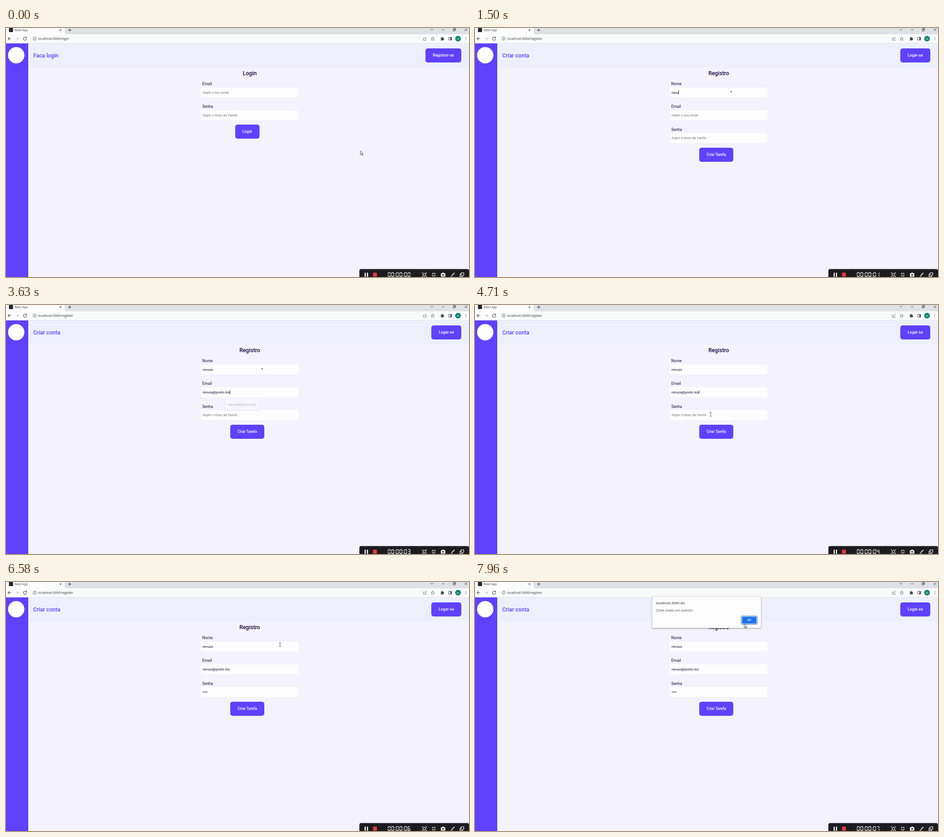
Animation of 1020x549 px, one loop 8 s. Source, as an HTML page:

```html
<!DOCTYPE html>
<html lang="pt">
<head>
<meta charset="utf-8">
<title>Criar conta</title>
<style>
  html, body { margin: 0; width: 100%; height: 100%; overflow: hidden; background: #f4f2fd; }
  svg { display: block; width: 100vw; height: 100vh; }
  .app { font-family: Roboto, "Liberation Sans", sans-serif; }
  .ui { font-family: "Open Sans", "Noto Sans", sans-serif; }
</style>
</head>
<body>
<svg id="stage" viewBox="0 0 1020 549" xmlns="http://www.w3.org/2000/svg">
  <defs>
    <radialGradient id="glow">
      <stop offset="0" stop-color="#f8d5da"/>
      <stop offset=".55" stop-color="#f2a3ab"/>
      <stop offset="1" stop-color="#e67883"/>
    </radialGradient>
    <filter id="shadow" x="-10%" y="-20%" width="120%" height="150%">
      <feDropShadow dx="0" dy="1" stdDeviation="1.2" flood-color="#000" flood-opacity=".35"/>
    </filter>
  </defs>
</svg>
<script>
const LOOP = 8000;
const PURPLE = '#5f41ff', INK = '#160b3b', GREY = '#5f6368', HINT = '#757575';
const USER = 'nevuza', MAIL = USER + '@ponto.test';
const SUGGESTIONS = [MAIL, USER + '.code@ponto.test', USER + '.pirelo@ponto.test', USER, USER + '@'];
const stage = document.getElementById('stage');

function add(parent, tag, attrs) {
  const el = document.createElementNS('http://www.w3.org/2000/svg', tag);
  for (const k in attrs) el.setAttribute(k, attrs[k]);
  parent.appendChild(el);
  return el;
}
const group = (parent = stage, attrs = {}) => add(parent, 'g', attrs);
const rect = (p, x, y, width, height, fill, rx = 0, more = {}) =>
  add(p, 'rect', { x, y, width, height, fill, rx, ...more });
const circle = (p, cx, cy, r, fill, more = {}) => add(p, 'circle', { cx, cy, r, fill, ...more });
const line = (p, d, stroke = '#3c4043', width = 1, more = {}) =>
  add(p, 'path', { d, stroke, fill: 'none', 'stroke-width': width, ...more });
function text(p, str, x, y, size, fill, more = {}) {
  const el = add(p, 'text', { x, y, fill, 'font-size': size, ...more });
  el.textContent = str;
  return el;
}
const show = (el, on) => el.setAttribute('display', on ? 'inline' : 'none');
const clamp = v => Math.min(1, Math.max(0, v));

function button(p, x, y, w, label, size) {
  rect(p, x, y, w, 31, PURPLE, 5);
  text(p, label, x + w / 2, y + 18.4, size, '#fff', { 'text-anchor': 'middle', 'font-weight': 500 });
}

function field(p, y, label, hint) {
  text(p, label, 432.5, y - 5, 8.5, INK);
  rect(p, 429, y, 215, 21.5, '#fdfdfd', 2.5);
  return text(p, hint, 433, y + 13.3, 7.4, HINT);
}

function drawBrowser() {
  const g = group(stage, { class: 'ui' });
  rect(g, 0, 0, 1020, 34, '#fdfdfd');
  add(g, 'path', { d: 'M129 0H1020V14H134Q129 14 129 9Z', fill: '#dee1e6' });
  rect(g, 53, 16.5, 896, 14, '#f8f9f9', 7);
  rect(g, 0, 33, 1020, 1, '#e4e5e8');
  rect(g, 6.5, 0, 9, 9, '#20232a', 1);
  text(g, 'React App', 19, 7.2, 6.2, '#3c4043');
  line(g, 'M118 2.7l4 4m0-4l-4 4M136.8 4.7h7M140.3 1.2v7', '#303236');
  line(g, 'M935.5 2.2l2.8 2.8 2.8-2.8M960.5 4h5M1010.8 1.5l5 5m0-5l-5 5', '#303236', .9);
  line(g, 'M985 2.5h4v4h-4zM986.3 2.3v-1.3h4v4h-1.2', '#303236', .9);
  line(g, 'M11.5 23.5h-7m3.3-3.3l-3.3 3.3 3.3 3.3', '#45484d', 1.1);
  line(g, 'M21 23.5h7m-3.3-3.3l3.3 3.3-3.3 3.3', '#c0c3c7', 1.1);
  line(g, 'M44.6 21.3a3.5 3.5 0 1 0 .7 3.2M45.4 19.6v2.6h-2.6', '#45484d', 1.1);
  circle(g, 63.2, 23.5, 3.4, 'none', { stroke: GREY, 'stroke-width': .9 });
  line(g, 'M63.2 23v2.3M63.2 21.3v.9', GREY, .9);
  const url = text(g, '', 71.3, 26.1, 7.2, '#303236');
  line(g, 'M920.5 22h-1.2v5h6.5v-2M921.3 24.8q.5-3 4-3m-1.5-1.8l2 1.8-2 1.8', GREY, .8);
  line(g, 'M940 19.7l1.1 2.6 2.8.2-2.1 1.9.7 2.8-2.5-1.5-2.5 1.5.7-2.8-2.1-1.9 2.8-.2z', GREY, .8);
  add(g, 'path', { d: 'M957.7 21.2h2a1.2 1.2 0 0 1 2.4 0h2v2a1.2 1.2 0 0 1 0 2.4v1.7h-6.4v-1.7a1.2 1.2 0 0 0 0-2.4z', fill: '#45484d' });
  line(g, 'M975.3 20.6h6.4v6h-6.4z', '#45484d', 1);
  rect(g, 979, 20.5, 3, 6.2, '#45484d');
  circle(g, 995.8, 23.5, 6.2, '#0a8272');
  text(g, 'M', 995.8, 25.8, 6, '#fff', { 'text-anchor': 'middle' });
  [20.7, 23.5, 26.3].forEach(y => circle(g, 1013, y, .8, '#45484d'));
  return url;
}

function drawPage(title, heading, topX, topLabel) {
  const g = group(stage, { class: 'app' });
  text(g, title, 60, 65.2, 12.1, PURPLE, { 'font-weight': 500 });
  button(g, topX, 45, 1003 - topX, topLabel, 8.5);
  text(g, heading, 537, 104.3, 12.2, INK, { 'text-anchor': 'middle', 'font-weight': 500 });
  return g;
}

rect(stage, 0, 0, 1020, 549, '#f4f2fd');
rect(stage, 49, 34, 971, 53, '#edf0fb');
rect(stage, 0, 34, 49, 515, PURPLE);
circle(stage, 22.5, 60, 18, '#fff');
const url = drawBrowser();

const login = drawPage('Faca login', 'Login', 924, 'Registrar-se');
field(login, 131.2, 'Email', 'Digite o seu email');
field(login, 181.4, 'Senha', 'Digite o título da Tarefa');
button(login, 505, 213, 53.5, 'Logar', 8.4);

const register = drawPage('Criar conta', 'Registro', 937, 'Logar-se');
const hints = { name: 'Digite o seu nome', mail: 'Digite o seu email' };
const nameText = field(register, 131.2, 'Nome', hints.name);
const mailText = field(register, 181.4, 'Email', hints.mail);
const passText = field(register, 231.8, 'Senha', 'Digite o título da Tarefa');
const dots = [0, 1, 2, 3].map(i => circle(register, 434.4 + 2.75 * i, 242.5, .95, INK));
button(register, 494, 264, 75, 'Criar Tarefa', 8.2);
const caret = rect(register, 0, 0, .9, 8.6, '#222');

// Suggestion list under the email field
const menu = group(stage, { class: 'ui' });
const menuBox = group(menu, { filter: 'url(#shadow)' });
add(menuBox, 'path', { d: 'M490 208.5l4.5-4.5 4.5 4.5z', fill: '#fdfdfd' });
const menuRect = rect(menuBox, 483, 207.5, 103, 101, '#fdfdfd', 2.5);
const menuItems = SUGGESTIONS.map((s, i) => text(menu, s, 489, 222 + 19.3 * i, 6.8, '#3c4043'));

const status = group(stage, { class: 'ui' });
rect(status, -2, 541.5, 63, 9, '#eceef5', 2);
text(status, 'localhost:3000/login', -2, 549.3, 6.1, GREY);

const alertBox = group(stage, { class: 'ui' });
rect(alertBox, 390, 31.5, 240.5, 70, '#fdfdfd', 2.5, { filter: 'url(#shadow)', stroke: '#b4b4ba', 'stroke-width': .6 });
text(alertBox, 'localhost:3000 diz', 398.5, 49, 7.7, '#202124');
text(alertBox, 'Conta criada com sucesso!', 398.5, 64.5, 6.6, '#3c4043');
rect(alertBox, 586.6, 75.1, 35.2, 18, '#fff', 2.5, { stroke: '#2b6fc4', 'stroke-width': 1.1 });
rect(alertBox, 588.3, 76.8, 31.8, 14.6, '#1a73e8', 1.5);
text(alertBox, 'OK', 604.2, 86.3, 6.2, '#fff', { 'text-anchor': 'middle', 'font-weight': 600 });

// Recorder bar with a seven-segment clock
const SEGMENTS = ['abcdef', 'bc', 'abged', 'abgcd', 'fgbc', 'afgcd', 'afgedc', 'abc', 'abcdefg', 'abfgcd'];
const SEGMENT_PATHS = {
  a: 'M1 .7h4', b: 'M5.3 1v3.6', c: 'M5.3 5.8v3.6', d: 'M1 9.8h4',
  e: 'M.7 5.8v3.6', f: 'M.7 1v3.6', g: 'M1 5.2h4'
};
const digitPath = n => [...SEGMENTS[n]].map(s => SEGMENT_PATHS[s]).join('');

function drawRecorder() {
  const g = group(), white = '#f4f4f4';
  add(g, 'path', { d: 'M778.5 549V535.5Q778.5 531.5 782.5 531.5H1016Q1020 531.5 1020 535V549Z', fill: '#1d1c20' });
  rect(g, 790, 539.5, 2.5, 9, white);
  rect(g, 795, 539.5, 2.5, 9, white);
  rect(g, 808.5, 539.5, 8.5, 8.5, '#ee3a43', 1.2);
  rect(g, 829, 533, .6, 16, '#0c0c0e');
  rect(g, 903, 533, .6, 16, '#0c0c0e');
  circle(g, 921.7, 544, 2.9, 'none', { stroke: white, 'stroke-width': 1.2 });
  line(g, 'M917 541.5v-2h2M924.5 539.5h2v2M917 546.5v2h2M924.5 548.5h2v-2', white);
  line(g, 'M938 542.2h2.7v-2.7M946.5 542.2h-2.7v-2.7M938 545.5h2.7v2.7M946.5 545.5h-2.7v2.7', white, 1.2);
  add(g, 'path', { d: 'M958 541h2.4l1-1.6h3.4l1 1.6h2v7h-9.8z', fill: white });
  circle(g, 963, 544.3, 1.8, '#1d1c20');
  line(g, 'M981.5 546.3l6.5-6.5', white, 1.8);
  line(g, 'M979.5 548.2h4', white, 1);
  line(g, 'M1002.5 539.8h6v5.2h-6zM1002 542.5h-1.8v5.4h6v-2', white, 1.2);
  [856.6, 874.6].forEach(x => [541.2, 545.6].forEach(y => rect(g, x, y, 1.3, 1.6, white)));
  return [841.3, 848.9, 859.3, 866.9, 877.3, 884.9].map(x =>
    line(g, digitPath(0), white, 1.35, { transform: `translate(${x} 538.4)` }));
}
const clock = drawRecorder();

// Pointer shapes, each with its hot spot at 0,0
const ring = circle(stage, 0, 0, 10.5, 'url(#glow)');
const mark = add(stage, 'path', { d: 'M562.3 139.6h4.2l-2.1 2.7z', fill: '#55555c' });
const pointer = group();
const shapes = {
  arrow: add(pointer, 'path', { d: 'M0 0V8.6L2 6.9 3.4 10 4.8 9.4 3.5 6.4H6.1Z' }),
  hand: add(pointer, 'path', { d: 'M-.8 0Q0-.8.8 0V3.4L4.6 4.4Q5.2 5 4.6 7.6L3.8 10H-1.2L-3.6 6.3Q-3.4 5-1.8 5.8L-.8 6.4Z' }),
  beam: add(pointer, 'path', { d: 'M-2-4.3h1.4q.6 0 .6.6V3.7q0 .6-.6.6H-2M2-4.3H.6Q0-4.3 0-3.7M0 3.7q0 .6.6.6H2' })
};
for (const k in shapes) {
  const beam = k === 'beam';
  for (const [a, v] of Object.entries({ fill: beam ? 'none' : '#fff', stroke: beam ? '#44444a' : '#222', 'stroke-width': .8 }))
    shapes[k].setAttribute(a, v);
}

const PATH = [
  [80, 781, 271], [380, 962, 62], [520, 961, 64], [790, 657, 128.5], [920, 618, 138],
  [1120, 564, 141], [4130, 564, 141], [4800, 517, 246], [5920, 517, 246], [6400, 600, 141],
  [6710, 606, 136], [6800, 600, 119], [6980, 547, 265], [7400, 547, 265], [7420, 612, 119],
  [7520, 614, 116], [7840, 593, 92]
];
const CLICKS = [[380, 900], [1130, 1380], [4800, 5120], [6980, 7210]];
const INPUT_TOPS = [131, 181, 232];

function pointerAt(t) {
  const i = PATH.findIndex(p => p[0] > t);
  if (i === 0) return PATH[0].slice(1);
  if (i < 0) return PATH[PATH.length - 1].slice(1);
  const [t0, x0, y0] = PATH[i - 1], [t1, x1, y1] = PATH[i];
  const u = (t - t0) / (t1 - t0), e = u * u * (3 - 2 * u);
  return [x0 + (x1 - x0) * e, y0 + (y1 - y0) * e];
}

function shapeAt(x, y, t) {
  if (t >= 7500) return 'arrow';
  const inside = (l, top, r, bottom) => x > l && x < r && y > top && y < bottom;
  if (inside(924, 45, 1003, 76) || (t > 480 && inside(494, 264, 569, 295))) return 'hand';
  return INPUT_TOPS.some(top => inside(429, top, 644, top + 21.5)) ? 'beam' : 'arrow';
}

// Letters typed at an even pace, the first at start and the last at end
function typed(count, start, end, t) {
  if (t < start) return 0;
  return Math.min(count, 1 + Math.floor((t - start) / (end - start) * (count - 1) + 1e-6));
}

function setValue(el, value, hint) {
  el.textContent = value || hint;
  el.setAttribute('fill', value ? INK : HINT);
  el.setAttribute('font-size', value ? 7.25 : 7.4);
}

function drawMenu(mail, t) {
  const fade = clamp((3700 - t) / 170);
  const open = mail.length > 0 && fade > 0;
  show(menu, open);
  if (!open) return;
  let row = 0;
  menuItems.forEach((el, i) => {
    const fits = SUGGESTIONS[i].startsWith(mail);
    show(el, fits);
    if (fits) el.setAttribute('y', 222 + 19.3 * row++);
  });
  menuRect.setAttribute('width', row > 2 ? 103 : 76);
  menuRect.setAttribute('height', 4.5 + 19.3 * row);
  menu.setAttribute('opacity', fade);
}

function drawCaret(t, passCount) {
  const el = t < 1790 ? nameText : t < 4800 ? mailText : passText;
  const empty = el.getAttribute('fill') === HINT;
  const width = el === passText ? passCount * 2.75 : empty ? 0 : el.getComputedTextLength();
  show(caret, t >= 1130 && t < 6400);
  caret.setAttribute('x', 433 + width);
  caret.setAttribute('y', el.getAttribute('y') - 6.9);
}

function render(t) {
  const registering = t >= 480;
  show(login, !registering);
  show(register, registering);
  url.textContent = 'localhost:3000/' + (registering ? 'register' : 'login');

  const name = USER.slice(0, typed(6, 1300, 1630, t));
  const mail = MAIL.slice(0, typed(6, 1870, 2280, t) + typed(10, 2460, 3330, t));
  const passCount = typed(4, 5240, 5540, t);
  setValue(nameText, name, hints.name);
  setValue(mailText, mail, hints.mail);
  show(passText, !passCount);
  dots.forEach((d, i) => show(d, i < passCount));
  drawCaret(t, passCount);
  drawMenu(mail, t);

  show(status, t >= 500 && t < 880);
  status.setAttribute('opacity', clamp((880 - t) / 180));
  show(alertBox, t >= 7500);

  const seconds = Math.max(0, Math.floor((t - 130) / 1000));
  clock[5].setAttribute('d', digitPath(seconds));

  const [x, y] = pointerAt(t);
  const resting = t >= 1500 && t < 4130;
  show(mark, resting);
  show(pointer, !resting);
  pointer.setAttribute('transform', `translate(${x} ${y})`);
  const kind = shapeAt(x, y, t);
  for (const k in shapes) show(shapes[k], k === kind);

  const click = CLICKS.find(([from, to]) => t >= from && t < to);
  show(ring, click);
  if (click) {
    ring.setAttribute('cx', x - .5);
    ring.setAttribute('cy', y + .5);
    ring.setAttribute('opacity', clamp((click[1] - t) / 90));
  }
}

const start = performance.now();
function tick() {
  render((performance.now() - start) % LOOP);
  requestAnimationFrame(tick);
}
tick();
</script>
</body>
</html>
```
